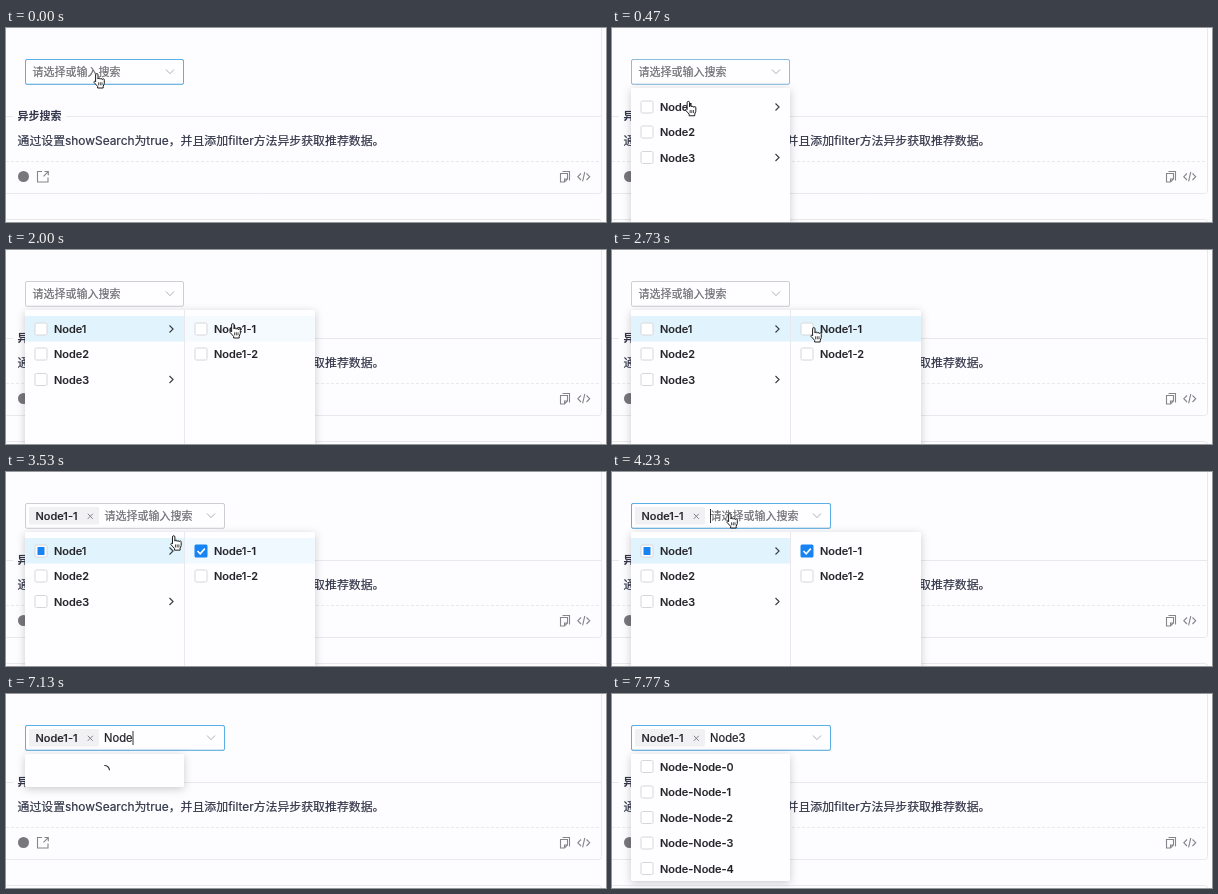
An HTML page for the animation above (8 s loop, 600x194 px).

```html
<!DOCTYPE html>
<html lang="zh-CN">
<head>
<meta charset="utf-8">
<title>异步搜索</title>
<style>
  html, body { margin: 0; width: 100%; height: 100%; overflow: hidden; background: #fdfcfe; }
  svg { display: block; width: 600px; height: 194px; }
  text {
    font: 500 11px Inter, "Noto Sans CJK SC", "Noto Sans CJK", sans-serif;
    color: #222226; fill: currentColor; stroke: currentColor; stroke-width: .2px; white-space: pre;
  }
  .title { font-weight: 700; color: #33364a; stroke: none; }
  .desc { font-size: 11.9px; font-weight: 400; color: #2f3346; }
  .hint { font-weight: 400; color: #6c6c70; }
  .typed { font-size: 11.2px; font-weight: 400; }
  .line { fill: none; stroke: #e9e8ed; }
  .icon { fill: none; stroke: #85858a; stroke-width: 1.1; }
  .arrow { fill: none; stroke: #3c3c40; stroke-width: 1.1; }
  .panel { fill: #fefdff; filter: drop-shadow(0 2px 4px rgba(0, 0, 0, .2)); }
</style>
</head>
<body>
<svg viewBox="0 0 600 194">
  <g class="line">
    <path d="M0 88.5H7M60 88.5H595.5M0 165.5H592.5q3 0 3-3V0M0 191.5H592.5q3 0 3 3"/>
    <path d="M0 133.5H595" stroke-dasharray="3 2"/>
  </g>
  <text class="title" x="11.5" y="92.3">异步搜索</text>
  <text class="desc" x="11.5" y="117.2">通过设置showSearch为true，并且添加filter方法异步获取推荐数据。</text>
  <circle cx="17.5" cy="148.5" r="5.5" fill="#77777c"/>
  <g class="icon">
    <path d="M36 143.5H31.5V154H42V149.5M38.5 143.5H42.3V147.3M42 143.8L37.5 148.3"/>
    <path d="M554.5 145.5H561.5V151L558.5 154H554.5ZM561.5 151H558.5V154M556.5 143.5H563.5V152.5"/>
    <path d="M575 145.5L571.8 148.7L575 152M580.5 145.5L583.7 148.7L580.5 152M578.8 144L576.6 153.4"/>
  </g>
  <g id="live"></g>
</svg>
<script>
const DURATION = 8000;
const BLUE = '#1684f5';
const OPEN = 200, EXPAND = 1580, CHECK = 2880, FOCUS = 4220, TYPE = 6070, RESULTS = 7490;
const BLINK = 505;
const ROW = 25.5;
const live = document.getElementById('live');
const pen = document.createElement('canvas').getContext('2d');

const clamp = v => Math.min(1, Math.max(0, v));
const ease = v => v * v * (3 - 2 * v);
const fade = (t, start, length = 200) => ease(clamp((t - start) / length));

// time, left, top of the pointer
const POINTER = [
  [250, 87, 45], [650, 62, 93], [900, 62, 94], [1070, 56, 82], [1400, 66, 78],
  [1600, 66, 78], [1990, 223, 73], [2300, 227, 74], [2430, 227, 74],
  [2730, 198, 77], [2850, 193, 76], [3230, 193, 76], [3950, 116, 42], [4200, 114, 41]
];
// time, content of the search field
const TYPED = [[FOCUS, ''], [TYPE, 'N'], [6330, 'No'], [6530, 'Nod'], [6730, 'Node'], [7230, 'Node3']];

const text = (x, y, s, cls = '') => `<text class="${cls}" x="${x}" y="${y}">${s}</text>`;
const rect = (x, y, w, h, attrs) => `<rect x="${x}" y="${y}" width="${w}" height="${h}" ${attrs}/>`;

function checkbox(x, cy, state) {
  if (state === 'on') {
    return rect(x, cy - 6.5, 13, 13, `rx="1.5" fill="${BLUE}"`) +
      `<path d="M${x + 3} ${cy}l2.7 2.8l4.6-5.2" fill="none" stroke="#fff" stroke-width="1.6"/>`;
  }
  return rect(x + .5, cy - 6, 12, 12, 'rx="1.5" fill="#fff" stroke="#d6d6da"') +
    (state === 'half' ? rect(x + 3, cy - 4, 7, 8, `fill="${BLUE}"`) : '');
}

function item(x, cy, label, { state, hover = 0, width = 159, arrow } = {}) {
  return (hover ? rect(x, cy - 13, width, ROW, `fill="#e1f4fe" opacity="${hover}"`) : '') +
    checkbox(x + 9.5, cy, state) + text(x + 29, cy + 4, label) +
    (arrow ? `<path class="arrow" d="M163.5 ${cy - 3.5}l3.6 3.5l-3.6 3.5"/>` : '');
}

function select(t, typed) {
  const tagged = t >= CHECK + 40;
  const width = tagged ? 199 : 158;
  const blue = t < 1500 ? 1 - fade(t, 380) : fade(t, 3720);
  const frame = attrs => rect(19.5, 31.5, width, 24.8, `rx="1.5" ${attrs}`);
  let out = frame('fill="#fefdff" stroke="#cdcdd2"') +
    frame(`fill="none" stroke="#58b0e6" opacity="${blue}"`) +
    `<path d="M${width + 2} 41.5l4 4.2l4-4.2" fill="none" stroke="#b0b0b5"/>`;
  if (tagged) {
    out += rect(23, 35, 70, 17.5, 'rx="1.5" fill="#f1f0f3"') + text(29.5, 48, 'Node1-1') +
      '<path d="M81.8 41.8l5 5m0-5l-5 5" stroke="#808086"/>';
  }
  const x = tagged ? 98.5 : 26.5;
  return out + (typed ? text(x - .5, 48, typed, 'typed') : text(x, 48, '请选择或输入搜索', 'hint'));
}

function caret(since, typed) {
  if (Math.floor(since / BLINK) % 2) return '';
  pen.font = '11.2px Inter, sans-serif';
  const x = 98.5 + pen.measureText(typed).width;
  return `<path d="M${x} 37V51" stroke="#333"/>`;
}

function cascade(t) {
  const p = fade(t, OPEN, 240);
  const expanded = t >= EXPAND;
  const checked = t >= CHECK;
  let out = rect(19, 60, expanded ? 290 : 159, 160, 'rx="1.5" class="panel"') +
    item(19, 79, 'Node1', { state: checked && 'half', hover: fade(t, 890, 150), arrow: true }) +
    item(19, 104, 'Node2', { hover: fade(t, 560) - fade(t, 890, 150) }) +
    item(19, 129.5, 'Node3', { arrow: true });
  if (expanded) {
    const hover = fade(t, 1900, 260) - fade(t, 3400, 260);
    out += '<path class="line" d="M178.5 60V194"/>' +
      item(179, 79, 'Node1-1', { state: checked && 'on', hover, width: 130 }) +
      item(179, 104, 'Node1-2');
  }
  return `<g opacity="${p}" transform="translate(0 60) scale(1 ${.8 + .2 * p}) translate(0 -60)">${out}</g>`;
}

function loading(t) {
  return rect(19, 60, 159, 33, 'rx="1.5" class="panel"') +
    `<path d="M98.5 71.5a5 5 0 0 1 5 5" fill="none" stroke="#3a3a3e" stroke-width="1.2"
      transform="rotate(${(t - 6140) * .36} 98.5 76.5)"/>`;
}

function results() {
  let out = rect(19, 60, 159, 127, 'rx="1.5" class="panel"');
  for (let i = 0; i < 5; i++) out += item(19, 72.5 + ROW * i, 'Node-Node-' + i);
  return out;
}

function pointer(t) {
  let x, y;
  const next = POINTER.findIndex(k => k[0] > t);
  if (next <= 0) [, x, y] = POINTER.at(next);
  else {
    const a = POINTER[next - 1], b = POINTER[next];
    const p = ease((t - a[0]) / (b[0] - a[0]));
    x = a[1] + (b[1] - a[1]) * p;
    y = a[2] + (b[2] - a[2]) * p;
  }
  return `<g transform="translate(${x} ${y})" stroke="#1c1c1e" stroke-linejoin="round">
    <path fill="#fff" d="M2.6 8.7V1.8a1.2 1.2 0 0 1 2.4 0V6a1.1 1.1 0 0 1 2.2.2a1.1 1.1 0 0 1 2.1.4
      a1 1 0 0 1 2 .6V10.5L10.2 13.3V15H4.6V13.3L1 9.4a1.1 1.1 0 0 1 1.6-1.2Z"/>
    <path stroke-width=".8" d="M5.6 9.3v3M7.3 9.3v3M9 9.3v3"/></g>`;
}

function draw(t) {
  const [since, typed] = TYPED.filter(k => k[0] <= t).pop() || [Infinity, ''];
  let out = select(t, typed);
  if (t >= since) out += caret(t - since, typed);
  if (t >= RESULTS) out += results();
  else if (t >= TYPE) out += loading(t);
  else if (t >= OPEN) out += cascade(t);
  if (t < TYPE) out += pointer(t);
  live.innerHTML = out;
}

const start = performance.now();
function tick() {
  draw((performance.now() - start) % DURATION);
  requestAnimationFrame(tick);
}
tick();
</script>
</body>
</html>
```
